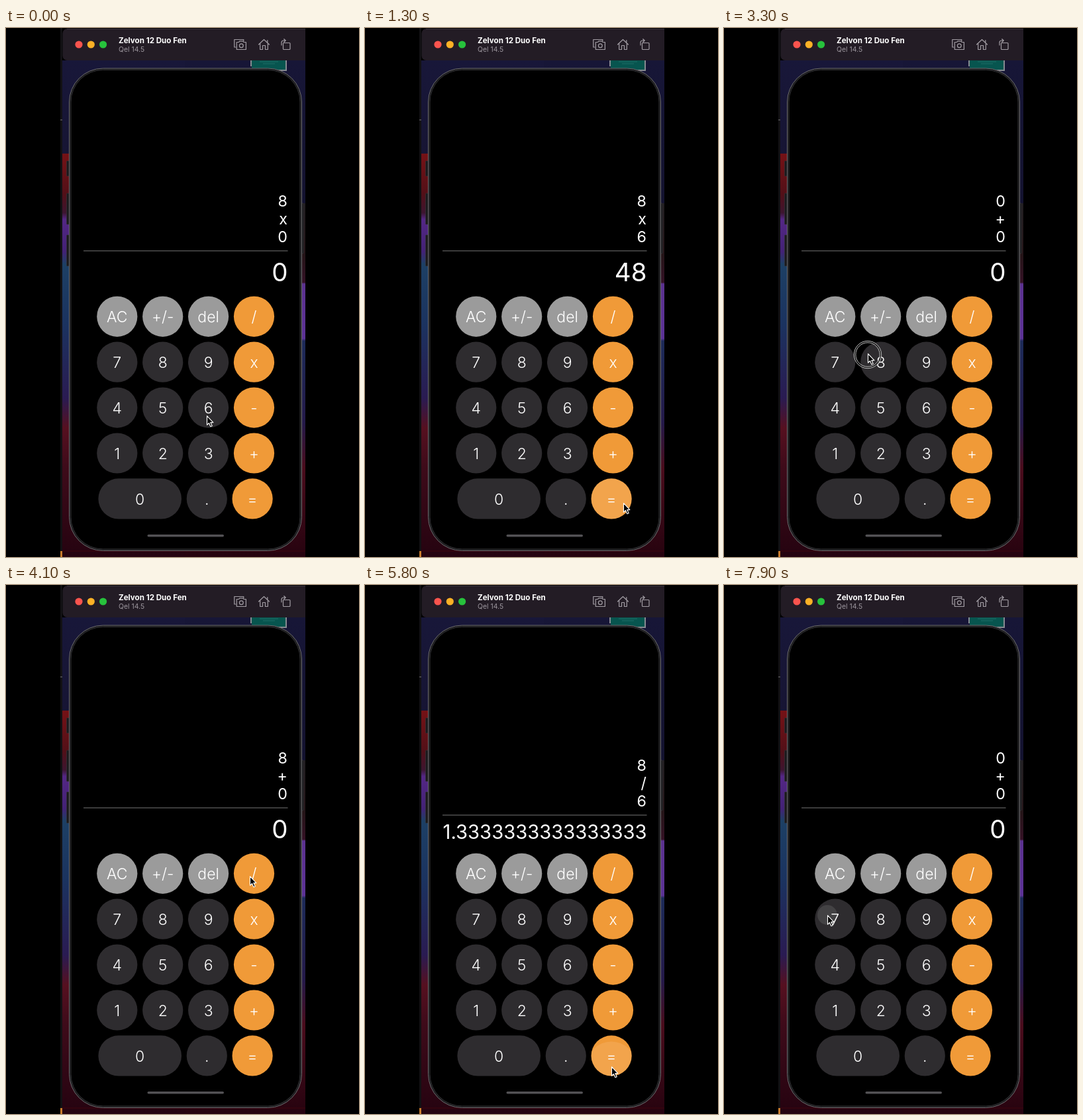
These frames come from a looping animation (533x800 px, 8000 ms). An HTML page:

```html
<!DOCTYPE html>
<html lang="en">
<head>
<meta charset="utf-8">
<title>Calculator</title>
<style>
  html, body { margin: 0; width: 100%; height: 100%; overflow: hidden; background: #000; }
  svg { display: block; width: 100vw; height: 100vh; }
  text { font-family: Inter, Roboto, sans-serif; fill: #fff; }
  .label { font-size: 23px; font-weight: 300; text-anchor: middle; }
  .entry { font-size: 23.3px; text-anchor: end; }
  .result { text-anchor: end; }
  .icon { fill: none; stroke: #a39ea5; stroke-width: 1.2; stroke-linejoin: round; stroke-linecap: round; }
</style>
</head>
<body>
<svg id="stage" viewBox="0 0 533 800">
  <defs>
    <linearGradient id="left" x1="0" y1="0" x2="0" y2="1">
      <stop offset="0" stop-color="#181739"/>
      <stop offset=".187" stop-color="#171534"/>
      <stop offset=".188" stop-color="#751216"/>
      <stop offset=".27" stop-color="#521018"/>
      <stop offset=".307" stop-color="#3d1530"/>
      <stop offset=".32" stop-color="#542785"/>
      <stop offset=".385" stop-color="#432276"/>
      <stop offset=".41" stop-color="#1d4065"/>
      <stop offset=".53" stop-color="#1b3360"/>
      <stop offset=".68" stop-color="#2a1b52"/>
      <stop offset=".74" stop-color="#561020"/>
      <stop offset=".82" stop-color="#3e0b1a"/>
      <stop offset="1" stop-color="#250310"/>
    </linearGradient>
    <linearGradient id="right" x1="0" y1="0" x2="0" y2="1">
      <stop offset="0" stop-color="#171637"/>
      <stop offset=".287" stop-color="#141330"/>
      <stop offset=".288" stop-color="#201d20"/>
      <stop offset=".39" stop-color="#251518"/>
      <stop offset=".447" stop-color="#351226"/>
      <stop offset=".45" stop-color="#5b318f"/>
      <stop offset=".56" stop-color="#5c3296"/>
      <stop offset=".565" stop-color="#1d2b59"/>
      <stop offset=".73" stop-color="#251a4a"/>
      <stop offset=".82" stop-color="#4b0d1d"/>
      <stop offset="1" stop-color="#26030f"/>
    </linearGradient>
  </defs>

  <rect width="533" height="800"/>
  <rect x="82" width="3" height="800" fill="#121114"/>
  <path d="M82 139h3" stroke="#77757a"/>
  <rect x="82" y="791" width="3" height="9" fill="#c77a2c"/>
  <rect x="85" y="49" width="185" height="751" fill="url(#left)"/>
  <rect x="270" y="49" width="182" height="751" fill="url(#right)"/>
  <path d="M85 791h367" stroke="#33040f" stroke-width="2"/>
  <path d="M370 47v11M423 47v17h-22" fill="none" stroke="#868b91" stroke-width="2"/>
  <rect x="371" y="47" width="51" height="16" fill="#07554f"/>
  <path d="M383 51h28M388 54h18" stroke="#2a7a70" stroke-width=".7"/>

  <rect x="85.5" y="1" width="380" height="48" rx="7" fill="#231c25"/>
  <path d="M92 1.5h360" stroke="#3a333c"/>
  <rect x="452" width="81" height="800"/>
  <circle cx="110" cy="25" r="5.6" fill="#f9544e"/>
  <circle cx="128.3" cy="25" r="5.6" fill="#fcb126"/>
  <circle cx="146.6" cy="25" r="5.6" fill="#27c23c"/>
  <text x="170" y="23" font-size="11.6" font-weight="700">Zelvon 12 Duo Fen</text>
  <text x="170" y="36" font-size="10.4" style="fill:#9b959d">Qel 14.5</text>

  <g class="icon">
    <path d="M347 29h-2.200v-11.500h14v2"/>
    <path d="M348.300 21.500h3.200l1.300-1.700h5l1.300 1.700h3.300v11h-14.100z"/>
    <circle cx="355.300" cy="26.800" r="2.900"/>
    <path d="M381.500 25l8-7.500 8 7.500M383.700 23.500v9h3.800v-6h4v6h3.800v-9M394.800 18.500v3.500"/>
    <rect x="418.500" y="22.500" width="10.500" height="10" rx="1"/>
    <path d="M416 26v-4q0-3 3-3h3M419.800 16.700l2.400 2.300-2.400 2.300"/>
  </g>

  <g fill="#1b1a1d" stroke="#39373b" stroke-width=".6">
    <rect x="91.500" y="201" width="5" height="23" rx="1"/>
    <rect x="91.500" y="250" width="5" height="47" rx="1"/>
    <rect x="91.500" y="313" width="5" height="47" rx="1"/>
    <rect x="445.500" y="265" width="4" height="76" rx="1"/>
  </g>
  <rect x="95.500" y="61" width="351" height="729.500" rx="51" fill="#1b1b1d" stroke="#6b6a6d"/>
  <rect x="98" y="63.500" width="346" height="724.500" rx="48.500" stroke="#303033"/>
  <rect x="213.500" y="766" width="115.500" height="3.600" rx="1.800" fill="#525154"/>

  <g id="display">
    <text class="entry" x="425" y="270"></text>
    <text class="entry" x="425" y="297"></text>
    <text class="entry" x="425" y="324"></text>
    <path d="M117 337h308.500" stroke="#777" stroke-width="1.200"/>
  </g>
  <text id="result" class="result" x="425.500"></text>

  <g id="keys"></g>
  <g id="ripples" fill="#fff"></g>
  <g id="labels"></g>

  <g id="cursor">
    <g id="ring" fill="none" stroke="#cfcfcf" stroke-width=".9">
      <circle cx="0" cy="2" r="19.500" stroke="#111" stroke-opacity=".7" stroke-width="2.500"/>
      <circle cx="0" cy="2" r="20.700"/>
      <circle cx="0" cy="2" r="18.200"/>
    </g>
    <path transform="translate(.5 .6) scale(.94)" d="M0 0v14.500l3.200-3 2.500 5.700 2.500-1.100-2.500-5.500h4.300z" stroke="#fff" stroke-width="1.200" stroke-linejoin="round"/>
  </g>
</svg>
<script>
  const LOOP = 8000, STEP = 100;
  const $ = id => document.getElementById(id);

  function add(parent, tag, attrs, text = '') {
    const el = document.createElementNS('http://www.w3.org/2000/svg', tag);
    for (const name in attrs) el.setAttribute(name, attrs[name]);
    el.textContent = text;
    parent.append(el);
    return el;
  }

  const ROWS = [
    ['AC', '+/-', 'del', '/'],
    ['7', '8', '9', 'x'],
    ['4', '5', '6', '-'],
    ['1', '2', '3', '+'],
    ['0', '.', '=']
  ];
  const R = 30.6;
  const shapes = {};

  ROWS.forEach((row, r) => row.forEach((name, c) => {
    const last = row.length === 3;
    const cx = last ? [202.2, 303.3, 372.1][c] : 167.8 + c * 68.9;
    const cy = 436.3 + r * 68.9;
    const half = name === '0' ? 62.8 : R;
    const fill = c === row.length - 1 ? '#f09a38' : r ? '#2e2c2f' : '#9b9b9b';
    shapes[name] = { x: cx - half, y: cy - R, width: half * 2, height: R * 2, rx: R };
    add($('keys'), 'rect', { ...shapes[name], fill });
    add($('labels'), 'text', { class: 'label', x: cx, y: cy + 8.7 }, name);
  }));

  // start, end, x, y
  const MOVES = [
    [0, 0, 303, 586],
    [400, 900, 390, 718],
    [1500, 2300, 178, 447],
    [2700, 3200, 217, 492],
    [3500, 4050, 368, 440],
    [4400, 4750, 333, 559],
    [5050, 5500, 372, 728],
    [6000, 6800, 197, 471],
    [6800, 7000, 178, 449],
    [7350, 7700, 156, 499]
  ];

  // time, first, operator, second, result
  const STATES = [
    [0, '8', 'x', '0', '0'],
    [400, '8', 'x', '6', '0'],
    [1100, '8', 'x', '6', '48'],
    [2500, '0', '+', '0', '0'],
    [3400, '8', '+', '0', '0'],
    [4300, '8', '/', '0', '0'],
    [5000, '8', '/', '6', '0'],
    [5700, '8', '/', '6', '1.3333333333333333'],
    [7200, '0', '+', '0', '0']
  ];

  const TAPS = [
    [260, '6'], [960, '='], [2360, 'AC'], [3260, '8'], [4160, '/'],
    [4800, '6'], [5550, '='], [7060, 'AC'], [7800, '7']
  ].map(([time, key], i) => {
    const clip = add($('ripples'), 'clipPath', { id: 'clip' + i });
    add(clip, 'rect', shapes[key]);
    const [cx, cy] = cursorAt(time);
    const el = add($('ripples'), 'circle', { cx, cy, 'clip-path': `url(#clip${i})` });
    return { time, el };
  });

  function cursorAt(t) {
    let [, , x, y] = MOVES[0];
    for (const [start, end, toX, toY] of MOVES.slice(1)) {
      if (t < start) break;
      const p = Math.min(1, (t - start) / (end - start));
      const k = (1 - Math.cos(Math.PI * p)) / 2;
      x += (toX - x) * k;
      y += (toY - y) * k;
    }
    return [x, y];
  }

  const lines = $('display').querySelectorAll('text');

  function showState(t) {
    const [, ...parts] = STATES.filter(s => s[0] <= t).pop();
    const value = parts.pop();
    const long = value.length > 12;
    parts.forEach((part, i) => lines[i].textContent = part);
    $('display').setAttribute('transform', `translate(0 ${long ? 11 : 0})`);
    $('result').textContent = value;
    $('result').setAttribute('y', long ? 384 : 383);
    $('result').setAttribute('font-size', long ? 29.2 : 38.5);
  }

  function render(t) {
    showState(t);
    $('cursor').setAttribute('transform', `translate(${cursorAt(t)})`);
    let pressed = false;
    for (const { time, el } of TAPS) {
      const age = t - time;
      pressed ||= age >= 0 && age < 90;
      const fade = Math.max(0, Math.min(1, (600 - age) / 250));
      el.setAttribute('r', Math.max(0, age * 0.15));
      el.setAttribute('opacity', age > 70 ? 0.1 * fade : 0);
    }
    $('ring').setAttribute('visibility', pressed ? 'visible' : 'hidden');
  }

  const origin = performance.now();
  function tick() {
    const t = (performance.now() - origin) % LOOP;
    render(Math.floor(t / STEP) * STEP);
    requestAnimationFrame(tick);
  }
  tick();
</script>
</body>
</html>
```
